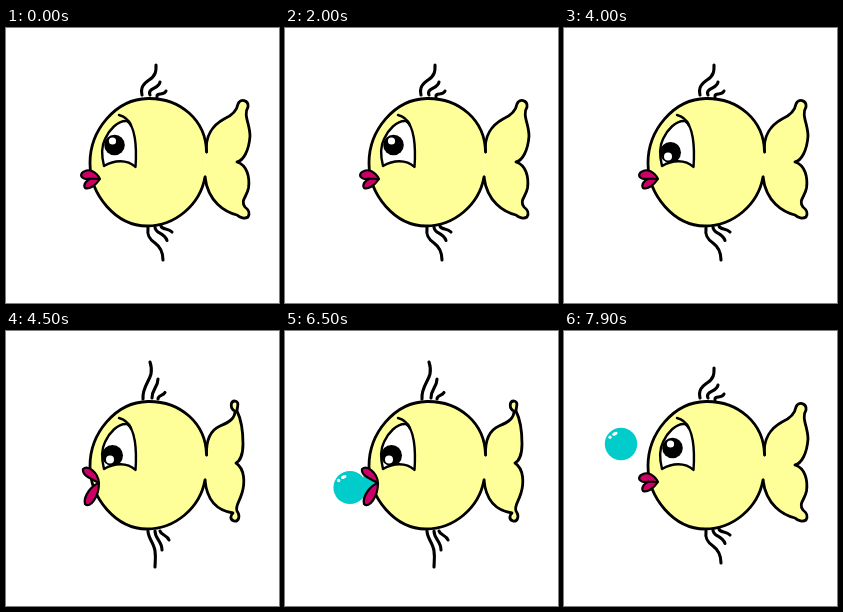
Write an HTML page that moves like this. It is 273 by 275 pixels and loops after 8000 ms.

```html
<!DOCTYPE html>
<html lang="en">
<head>
<meta charset="utf-8">
<title>Fish blowing a bubble</title>
<style>
html, body { margin: 0; width: 100%; height: 100%; overflow: hidden; background: #fff; }
svg { display: block; width: 100vw; height: 100vh; }
.ink { fill: none; stroke: #000; stroke-width: 2.8; stroke-linecap: round; stroke-linejoin: round; }
.hair { stroke-width: 3.1; }
.lid { stroke-width: 2.4; }
.skin { fill: #ffff99; }
.water { fill: #00cccc; }
.lip { fill: #cc0066; stroke-width: 2.2; }
</style>
</head>
<body>
<svg viewBox="0 0 273 275">
  <defs>
    <path id="eye" d="M98 138C96 130 95 119 99 111C103 102 112 92 121 93C129 98 131 118 129.500 139C121 131 108 132 98 138Z"/>
    <path id="body" d="M200.500 124C200 92 174 70 142 70.500C109 71 84 103 84 135C84 167 110 198 141 198C169 198 194 177 199 149"/>
    <clipPath id="lid"><use href="#eye"/></clipPath>
  </defs>
  <path id="tail" class="ink skin"/>
  <use href="#body" class="skin"/>
  <use href="#body" class="ink"/>
  <path id="top" class="ink hair"/>
  <path id="bottom" class="ink hair"/>
  <g clip-path="url(#lid)">
    <rect x="90" y="85" width="45" height="60" fill="#fff"/>
    <g id="up">
      <circle cx="108.500" cy="117" r="10.300"/>
      <circle cx="106.500" cy="113" r="3.600" fill="#fff"/>
    </g>
    <g id="down">
      <circle cx="106.500" cy="124.500" r="10.500"/>
      <circle cx="104" cy="128.500" r="4" fill="#fff"/>
    </g>
  </g>
  <use href="#eye" class="ink lid"/>
  <path class="ink lid" d="M113 87Q121 89 125 97"/>
  <path id="neck" class="water" d="M78 145L94 152L81 168Z"/>
  <g id="bubble">
    <circle r="1" class="water"/>
    <ellipse cx="-.38" cy="-.63" rx=".18" ry=".1" transform="rotate(-25 -.38 -.63)" fill="#fff"/>
    <circle cx="-.68" cy="-.42" r=".1" fill="#fff"/>
  </g>
  <path id="lips" class="ink lip"/>
</svg>
<script>
const $ = id => document.getElementById(id);

// Three fin poses: relaxed, stretched and swept back.
const tops = {
  rest: 'M136 67C134 58 139 55 143 52C151 47 150 41 150 37M144 67C141 60 153 61 154 54M151 69C150 64 158 68 160 63',
  tall: 'M137 68C136 57 143 51 145 43C146 38 145 34 144 31M146 67C146 58 152 56 152 48M152 68C152 64 157 65 159 61.5',
  swept: 'M136 68C136 60 141 53 149 53C160 53 166 53 168 47M142 69C141 59 149 58 155 59Q160 60 163 57M147 69C147 64 155 68 164 66'
};
const bottoms = {
  rest: 'M142 200C141 207 143 211 149 215C156 220 157 226 157 232M149 199C149 206 158 204 161 212.5M155 198C156 202 162 200 166 204',
  tall: 'M142 200C142 207 148 212 149 220C150 227 149 232 149 236M149 200C149 208 156 210 156 219M154 200C155 204 161 204 163 209',
  swept: 'M143 199C144 208 146 213.5 154 213.500C164 212 171 214 175 220M148 199C149 206 156 207 161 206Q167 206 168 209M152 198C154 204 161 200 170 202'
};
const tails = {
  rest: 'M200.500 124C199 108 207 97 218 91C227 87 231 82 232 76C234 70 243 72 242 79C237 87 244 96 244 108C243 123 237 133 231 134C241 137 244 149 242.500 160C241 169 234 172 239 179C243 182 244 186 242 189C239 191 234 190 231 187C219 184 202 174 199 149',
  tall: 'M200.500 124C200 109 205 99 214 95C224 91 229 87 229 80C224 78 224 70 229 70C234 71 231 76 231 80C236 90 237 102 237 113C237 123 234 130 230 132C239 138 239 152 236 162C233 172 229 175 231 180C235 186 232 191 228 190C223 188 225 184 227 182C214 180 201 172 199 149',
  swept: 'M200.500 124C200 109 205 98 216 94C225 91 229 87 229 80L228.500 75C229 70 236 71 236 77C236 85 238 92 238.500 103C239 119 238 130 231 133C240 138 241 150 238 162C236 173 235 183 233.500 191C232 197 225 196 225 190C226 187 227 184 225 183C211 181 200 166 199 149M230 78Q232 88 231 97M230 160Q231 171 227 183'
};
const mouths = {
  shut: 'M94 151C90 143 83 141 79 143C74 145 74 149 78 150.500C81 151.500 83 151 85 150.500C80 152 77 157 79 160C83 162 90 157 94 151ZM85 150.500L92 151',
  open: 'M93 152C92 141 82 134 77 138C76 144 83 147 93 152ZM93 152C86 154 77 165 79 173C84 178 93 166 93 152Z'
};
mouths.blow = mouths.open;

// start, upper fins, lower fins, mouth, gaze, bubble [x, y, radius]
const poses = [
  [0, 'rest', 'rest', 'shut', 'up'],
  [500, 'tall', 'tall', 'open', 'up'],
  [1000, 'rest', 'rest', 'shut', 'up'],
  [1500, 'swept', 'swept', 'shut', 'up'],
  [2000, 'rest', 'rest', 'shut', 'up'],
  [2500, 'tall', 'tall', 'open', 'up'],
  [3000, 'rest', 'rest', 'shut', 'up'],
  [3500, 'swept', 'swept', 'shut', 'up'],
  [4000, 'rest', 'rest', 'shut', 'down'],
  [4500, 'tall', 'tall', 'open', 'down'],
  [5000, 'rest', 'tall', 'blow', 'down', [85, 155, 6.5]],
  [5500, 'swept', 'swept', 'blow', 'down', [79, 156, 10.7]],
  [6000, 'rest', 'rest', 'blow', 'down', [76.5, 156, 13.5]],
  [6500, 'tall', 'tall', 'blow', 'down', [65, 156.5, 16.6]],
  [7000, 'rest', 'rest', 'open', 'down', [59.5, 150, 16.4]],
  [7200, 'rest', 'rest', 'shut', 'down', [59.5, 150, 16.4]],
  [7400, 'swept', 'swept', 'shut', 'up', [59.5, 132, 16.2]],
  [7900, 'rest', 'rest', 'shut', 'up', [57, 113, 16.2]]
];

const show = (id, on) => { $(id).style.display = on ? '' : 'none'; };

function draw(time) {
  const t = time % 8000;
  const [, upper, lower, mouth, gaze, ball] = poses.findLast(p => p[0] <= t);
  $('top').setAttribute('d', tops[upper]);
  $('bottom').setAttribute('d', bottoms[lower]);
  $('tail').setAttribute('d', tails[upper]);
  $('lips').setAttribute('d', mouths[mouth]);
  show('up', gaze === 'up');
  show('down', gaze === 'down');
  show('neck', mouth === 'blow');
  show('bubble', ball);
  if (ball) $('bubble').setAttribute('transform', `translate(${ball[0]} ${ball[1]}) scale(${ball[2]})`);
}

const start = performance.now();
function tick() {
  draw(performance.now() - start);
  requestAnimationFrame(tick);
}
tick();
</script>
</body>
</html>
```
